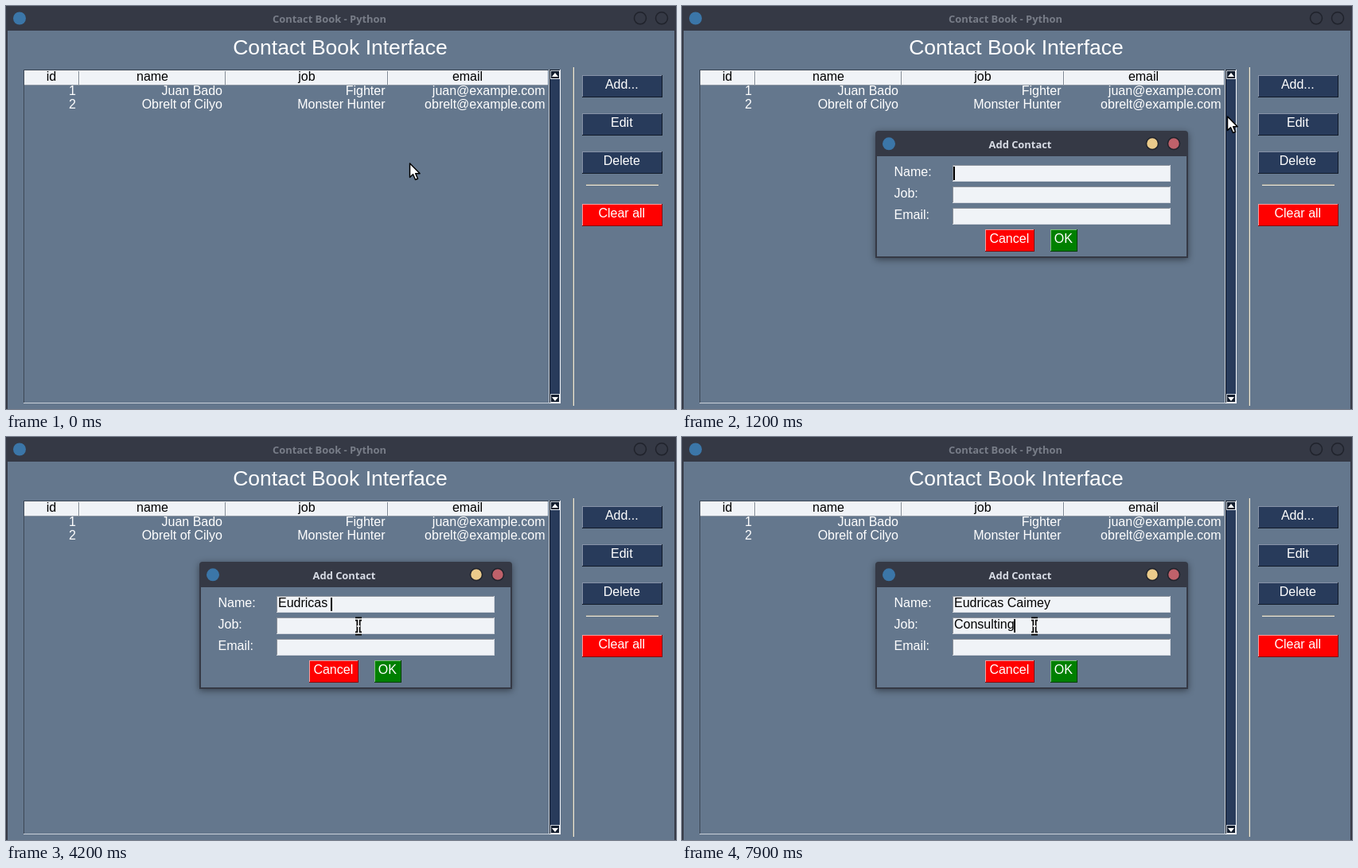
An HTML page that plays this animation: 842 by 507 pixels, repeating every 8 s.

```html
<!DOCTYPE html>
<html lang="en">
<head>
<meta charset="utf-8">
<title>Contact Book</title>
<style>
  html, body { margin: 0; width: 100%; height: 100%; overflow: hidden; background: #64778d; }
  svg { display: block; width: 842px; height: 507px; }
  text { font: 16px "Liberation Sans", Arial, sans-serif; fill: #fff; white-space: pre; }
  .caption { font: bold 12.9px "Open Sans", "Noto Sans", sans-serif; }
  .heading { font-size: 26.5px; }
  .ink { fill: #000; }
</style>
</head>
<body>
<svg id="stage" viewBox="0 0 842 507" xmlns="http://www.w3.org/2000/svg"></svg>
<script>
const LOOP = 8000, STEP = 100;
const BG = '#64778d', FRAME = '#353945', NAVY = '#283b5b', PALE = '#f0f3f7';
const stage = document.getElementById('stage');

function el(parent, tag, attrs = {}, text) {
  const node = document.createElementNS('http://www.w3.org/2000/svg', tag);
  for (const key in attrs) node.setAttribute(key, attrs[key]);
  if (text !== undefined) node.textContent = text;
  parent.appendChild(node);
  return node;
}
const group = parent => el(parent, 'g');
const rect = (p, x, y, width, height, fill) => el(p, 'rect', { x, y, width, height, fill });
const label = (p, x, y, text, anchor = 'start', cls = '') =>
  el(p, 'text', { x, y, 'text-anchor': anchor, class: cls }, text);
const show = (node, on) => node.setAttribute('display', on ? 'inline' : 'none');
const place = (node, x, y) => node.setAttribute('transform', `translate(${x} ${y})`);

// One-pixel relief: first colour on top and left, second on bottom and right
function bevel(p, x, y, w, h, lit, dark) {
  rect(p, x, y, w, 1, lit);
  rect(p, x, y, 1, h, lit);
  rect(p, x, y + h - 1, w, 1, dark);
  rect(p, x + w - 1, y, 1, h, dark);
}

function button(p, x, y, w, text, fill, lit, dark) {
  const g = group(p);
  rect(g, x, y, w, 28, fill);
  bevel(g, x, y, w, 28, lit, dark);
  label(g, x + w / 2 - 0.7, y + 17, text, 'middle');
  return g;
}

function caption(p, iconX, titleX, y, text, closeX) {
  el(p, 'circle', { cx: iconX, cy: y, r: 8, fill: '#3b76a8' });
  const title = label(p, titleX, y + 5.5, text, 'middle', 'caption');
  const dots = [closeX - 27, closeX].map(cx =>
    el(p, 'circle', { cx, cy: y - 0.2, r: 7.5, stroke: '#20232c', 'stroke-width': 1.5 }));
  return active => {
    title.style.fill = active ? '#d8dce5' : '#787d88';
    dots.forEach((dot, i) =>
      dot.setAttribute('fill', active ? ['#ebcb8b', '#bf616a'][i] : FRAME));
  };
}

// Main window
rect(stage, 0, 0, 842, 507, FRAME);
rect(stage, 2, 31, 838, 476, BG);
const setMainActive = caption(stage, 17, 406.5, 15.5, 'Contact Book - Python', 824);
label(stage, 420, 61, 'Contact Book Interface', 'middle', 'heading');

bevel(stage, 22, 80, 661, 420, '#3c4755', '#c9d0d9');
rect(stage, 23, 81, 658, 18, PALE);
rect(stage, 23, 99, 658, 1, '#8d97a3');
[91, 275, 479].forEach(x => {
  rect(stage, x, 82, 1, 17, '#7f8894');
  rect(stage, x + 1, 82, 1, 17, '#fff');
});
[['id', 57], ['name', 184], ['job', 378], ['email', 580]]
  .forEach(([text, x]) => label(stage, x, 94, text, 'middle', 'ink'));
[['1', 'Juan Bado', 'Fighter', 'juan@example.com'],
 ['2', 'Obrelt of Cilyo', 'Monster Hunter', 'obrelt@example.com']]
  .forEach((row, r) => row.forEach((text, c) =>
    label(stage, [88, 272, 476.5, 677.5][c], 112 + 17 * r, text, 'end')));

rect(stage, 683, 80, 14, 420, NAVY);
bevel(stage, 683, 80, 14, 420, '#111a28', '#f4f6f9');
rect(stage, 684, 81, 12, 10, '#141e2e');
rect(stage, 684, 489, 12, 10, '#141e2e');
bevel(stage, 684, 81, 12, 11, '#cfd6df', '#e6eaf0');
bevel(stage, 684, 488, 12, 11, '#cfd6df', '#e6eaf0');
el(stage, 'path', { d: 'M686 89L690 84L694 89ZM686 492L690 497L694 492Z', fill: '#fff' });

rect(stage, 712, 77, 1, 426, '#8a8f8c');
rect(stage, 713, 77, 1, 426, '#efe9d9');
rect(stage, 729, 224, 91, 1, '#8a8f8c');
rect(stage, 729, 225, 91, 1, '#efe9d9');

[['Add...', 87], ['Edit', 135], ['Delete', 183]]
  .forEach(([text, y]) => button(stage, 724, y, 101, text, NAVY, '#8793a8', '#121b2a'));
button(stage, 724, 249, 101, 'Clear all', '#f00', '#ff9a9a', '#8a0000');

const hover = group(stage);
rect(hover, 724, 87, 101, 28, '#fff');
const hoverText = label(hover, 773.8, 104, 'Add...', 'middle');
hoverText.style.fill = NAVY;
const pressed = group(hover);
bevel(pressed, 724, 87, 101, 28, '#59667a', '#e8ebf0');
el(pressed, 'rect', { x: 725.5, y: 88.5, width: 98, height: 25, fill: 'none',
  stroke: '#000', 'stroke-dasharray': '1 1' });

// Dialog
const dialog = group(stage);
dialog.style.filter = 'drop-shadow(0 2px 4px rgba(0,0,0,.45))';
el(dialog, 'path', { d: 'M243 317V161Q243 157 247 157H632Q636 157 636 161V317Z', fill: FRAME });
rect(dialog, 245, 189, 389, 126, BG);
caption(dialog, 260, 425, 173.3, 'Add Contact', 618)(true);

function field(y, text) {
  label(dialog, 266.5, y + 14, text);
  rect(dialog, 340, y, 274, 21, PALE);
  bevel(dialog, 340, y, 274, 21, '#8b919a', '#d5d9e0');
  return { text: label(dialog, 342, y + 14, '', 'start', 'ink'),
           caret: rect(dialog, 341, y + 2, 2, 17, '#000') };
}
const nameField = field(200, 'Name:');
const jobField = field(227, 'Job:');
show(field(254, 'Email:').caret, false);
button(dialog, 381, 281, 62, 'Cancel', '#f00', '#ff9a9a', '#8a0000');
button(dialog, 463, 281, 34, 'OK', '#008000', '#7fc07f', '#003c00');

// Pointers
const arrow = el(stage, 'path', {
  d: 'M0 0V17.5L4 13.8L7 20.5L10 19.2L7.2 12.7H12.6Z',
  fill: '#fff', stroke: '#000', 'stroke-width': 1.5, 'stroke-linejoin': 'round' });
const beam = group(stage);
[['#000', 5], ['#fff', 1.6]].forEach(([stroke, w]) => el(beam, 'path', {
  d: 'M-4 -9H4M-4 9H4M0 -9V9M-2 0H2', fill: 'none', stroke, 'stroke-width': w }));
place(beam, 443, 238);

// Keystrokes: time and text, '<' deletes one character
const nameKeys = [[2300, 'E'], [2600, 'udr'], [2900, 'o'], [3300, '<'], [3500, 'i'],
  [3600, 'c'], [3700, 'a'], [3800, 's'], [4200, ' '], [4400, 'C'], [4600, 'a'],
  [4800, 'i'], [5000, 'm'], [5200, 'e'], [5300, 'y']];
const jobKeys = [[5800, 'C'], [6000, 'o'], [6200, 'n'], [6900, 's'], [7200, 'u'],
  [7400, 'l'], [7500, 't'], [7600, 'i'], [7800, 'n'], [7900, 'g']];

const typed = (keys, t) => keys.reduce((s, [at, key]) =>
  at > t ? s : key === '<' ? s.slice(0, -1) : s + key, '');

function drawField({ text, caret }, keys, t, from, to) {
  text.textContent = typed(keys, t);
  const width = text.textContent ? text.getComputedTextLength() : 0;
  caret.setAttribute('x', 341 + Math.round(width));
  show(caret, t >= from && t < to && (t - from) % 900 < 600);
}

function pointer(t) {
  if (t < 1200) {
    const k = Math.min(t / 800, 1), s = k * k * (3 - 2 * k);
    return [507.5 + 252 * s, 198 - 97.5 * s];
  }
  const k = (t - 1200) / 300, s = k * (2 - k);
  return [685.5 - 242 * s, 139 + 99 * s];
}

function draw(t) {
  const [x, y] = pointer(Math.min(t, 1500));
  const down = t >= 1000 && t < 1200;
  place(arrow, x, y);
  show(arrow, t < 1500);
  show(beam, t >= 1500);
  show(hover, t < 1200 && x > 724);
  show(pressed, down);
  place(hoverText, +down, +down);
  setMainActive(down);
  show(dialog, t >= 1200);
  drawField(nameField, nameKeys, t, 1200, 5600);
  drawField(jobField, jobKeys, t, 5600, LOOP);
}

const start = performance.now();
function tick() {
  const t = (performance.now() - start) % LOOP;
  draw(Math.floor(t / STEP) * STEP);
  requestAnimationFrame(tick);
}
tick();
</script>
</body>
</html>
```
